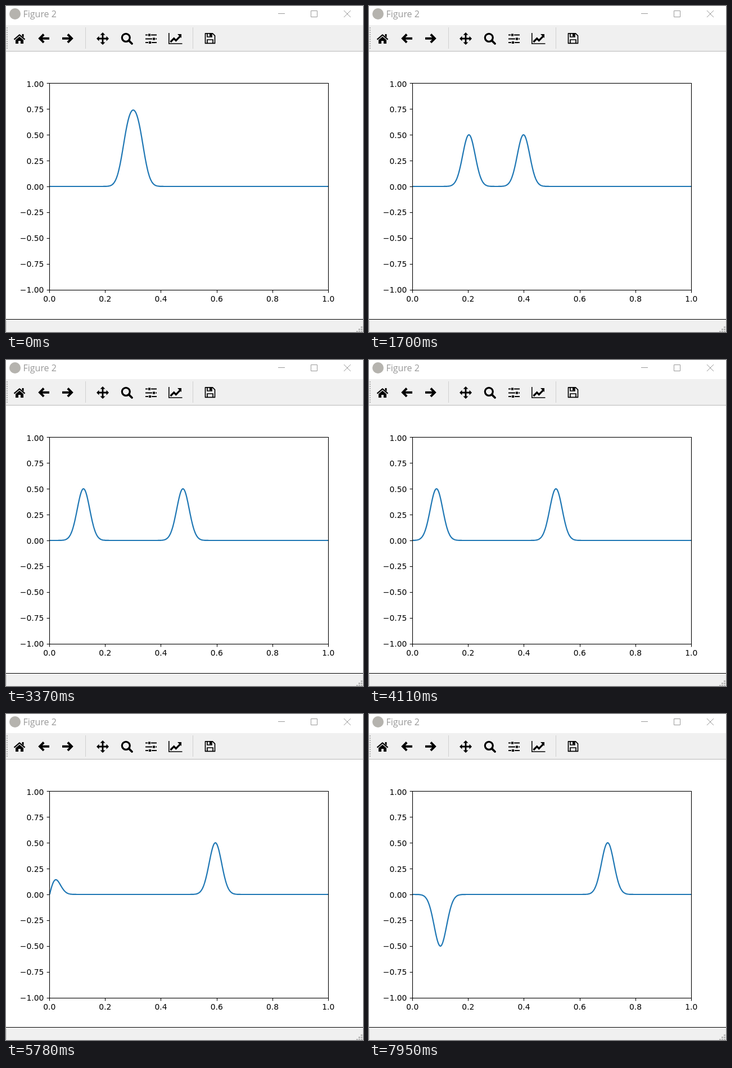
An HTML page that plays this animation: 635x580 px, repeating every 8000 ms.

```html
<!DOCTYPE html>
<html lang="en">
<head>
<meta charset="utf-8">
<title>Figure 2</title>
<style>
  html, body { margin: 0; width: 100%; height: 100%; overflow: hidden; background: #fff; }
  svg { display: block; }
  .title { font: 16px "Open Sans", sans-serif; fill: #999; }
  .label { font: 13.89px "DejaVu Sans", sans-serif; }
  .line { fill: none; stroke: #000; }
</style>
</head>
<body>
<svg width="635" height="580" viewBox="0 0 635 580">
  <!-- title bar -->
  <circle cx="16" cy="14" r="10" fill="#b5b3ae"/>
  <text class="title" x="30.5" y="20">Figure 2</text>
  <path d="M484 13.5h12M542.5 8.5h11v11h-11zM601 8l12 12M613 8l-12 12" fill="none" stroke="#999"/>

  <!-- toolbar -->
  <rect y="34" width="635" height="46" fill="#f0f0f0"/>
  <path d="M0 80.5H635" stroke="#b8b8b8"/>
  <path d="M2 38V77" stroke="#b4b4b4" stroke-width="2" stroke-dasharray="2 2"/>
  <path d="M141.5 38V76M332.5 38V76" stroke="#d0d0d0"/>

  <g id="home">
    <path class="line" d="M14.5 59.7L24 51.4L33.5 59.7" stroke-width="2.2"/>
    <path d="M28.5 50h3v6l-3-2.5zM17 60.5L24 54.5L31 60.5V67H26V62H22V67H17z"/>
  </g>
  <path class="line" d="M67.2 50.5L60 57.7L67.2 64.9M61 57.7H77" stroke-width="3.9"/>
  <path class="line" d="M109.8 50.5L117 57.7L109.8 64.9M116 57.7H100" stroke-width="3.9"/>
  <g id="pan">
    <path class="line" d="M164 58H180M172 50V66" stroke-width="2.8"/>
    <path d="M161 58l4.5-4.5v9zM183 58l-4.5-4.5v9zM172 47l-4.5 4.5h9zM172 69l-4.5-4.5h9z"/>
  </g>
  <g id="zoom" class="line">
    <circle cx="213.3" cy="56.3" r="7" stroke-width="3.2"/>
    <path d="M218.8 61.8L224 67" stroke-width="3.8" stroke-linecap="round"/>
  </g>
  <g id="sliders">
    <path class="line" d="M248 51.5H268M248 58.5H268M248 65H268" stroke-width="1.8"/>
    <path d="M252.5 49h5v5h-5zM260.5 56h5v5h-5zM253.5 62.5h5v5h-5z" stroke="#f0f0f0"/>
  </g>
  <g id="chart">
    <path class="line" d="M289.8 48V67H313.5" stroke-width="1.6"/>
    <path class="line" d="M292.5 64L298.7 57.8L302.3 61.4L309.5 54.2" stroke-width="3.2"/>
    <path d="M305 50H312V57z"/>
  </g>
  <g id="save" class="line" stroke-width="1.7">
    <path d="M354.5 48.8H367.5L371.5 52.8V66.4H354.5z" stroke-linejoin="round"/>
    <path d="M358 49V55H366V49M358 66V60H368V66"/>
    <path d="M363.5 49V54" stroke-width="3"/>
  </g>

  <!-- status bar -->
  <rect y="558" width="635" height="22" fill="#f0f0f0"/>
  <path d="M0 557.5H635" stroke="#000"/>
  <path d="M.5 560V579" stroke="#cfcfcf"/>
  <path d="M631 570h3v3h-3zM627 574h3v3h-3zM631 574h3v3h-3zM623 578h3v2h-3zM627 578h3v2h-3zM631 578h3v2h-3z" fill="#b9b9b9"/>

  <!-- plot -->
  <clipPath id="area"><rect x="77" y="137" width="497" height="369"/></clipPath>
  <path id="wave" clip-path="url(#area)" fill="none" stroke="#1f77b4" stroke-width="2.2" stroke-linejoin="round"/>
  <rect class="line" x="77.5" y="137.5" width="496" height="368" stroke-width="1.1"/>
  <g id="ticks"></g>
</svg>
<script>
const LOOP = 8000;
const LEFT = 77.5, WIDTH = 496, ZERO_Y = 321, UNIT_Y = 183.8;
const START = 0.3, SHARPNESS = 1000, FIRST_SHIFT = 0.01738, SHIFT_PER_STEP = 0.002236;
// Start of each run of 18 steps (the first run has 17).
const RUNS = [40, 860, 1700, 2530, 3370, 4210, 5030, 5880, 6720, 7540, 8368];

const wave = document.getElementById("wave");

function drawTicks() {
  let markup = "";
  const label = (x, y, anchor, value) =>
    `<text class="label" x="${x}" y="${y}" text-anchor="${anchor}">${value}</text>`;
  const mark = d => `<path class="line" stroke-width="1.1" d="${d}"/>`;
  for (let i = 0; i <= 8; i++) {
    const value = (1 - i / 4).toFixed(2).replace("-", "\u2212");
    markup += mark(`M72.6 ${137.5 + 46 * i}H77`)
      + label(67.3, Math.round(143.6 + 45.75 * i), "end", value);
  }
  for (let i = 0; i <= 5; i++) {
    const x = LEFT + i * WIDTH / 5;
    markup += mark(`M${Math.floor(x) + 0.5} 506V510.4`)
      + label(x - 0.3, 526, "middle", (i / 5).toFixed(1));
  }
  document.getElementById("ticks").innerHTML = markup;
}

function stepAt(time) {
  if (time < RUNS[0]) return 0;
  const run = RUNS.findLastIndex(start => time >= start);
  const count = run ? 18 : 17;
  const progress = (time - RUNS[run] + 12) / (RUNS[run + 1] - RUNS[run]);
  const step = Math.min(count - 1, Math.floor(progress * count));
  return 18 * run + step + (run ? 0 : 1);
}

const pulse = x => 0.5 * Math.exp(-SHARPNESS * x * x);

// Two travelling pulses; the left one reflects upside down from the fixed end.
function displacement(x, shift) {
  const left = START - shift;
  return pulse(x - START - shift) + pulse(x - left) - pulse(x + left);
}

function draw(time) {
  const shift = FIRST_SHIFT + SHIFT_PER_STEP * stepAt(time);
  const points = [];
  for (let px = 0; px <= WIDTH; px++) {
    const y = ZERO_Y - UNIT_Y * displacement(px / WIDTH, shift);
    points.push(`${LEFT + px} ${y.toFixed(2)}`);
  }
  wave.setAttribute("d", "M" + points.join("L"));
}

function tick() {
  draw(performance.now() % LOOP);
  requestAnimationFrame(tick);
}

drawTicks();
tick();
</script>
</body>
</html>
```
